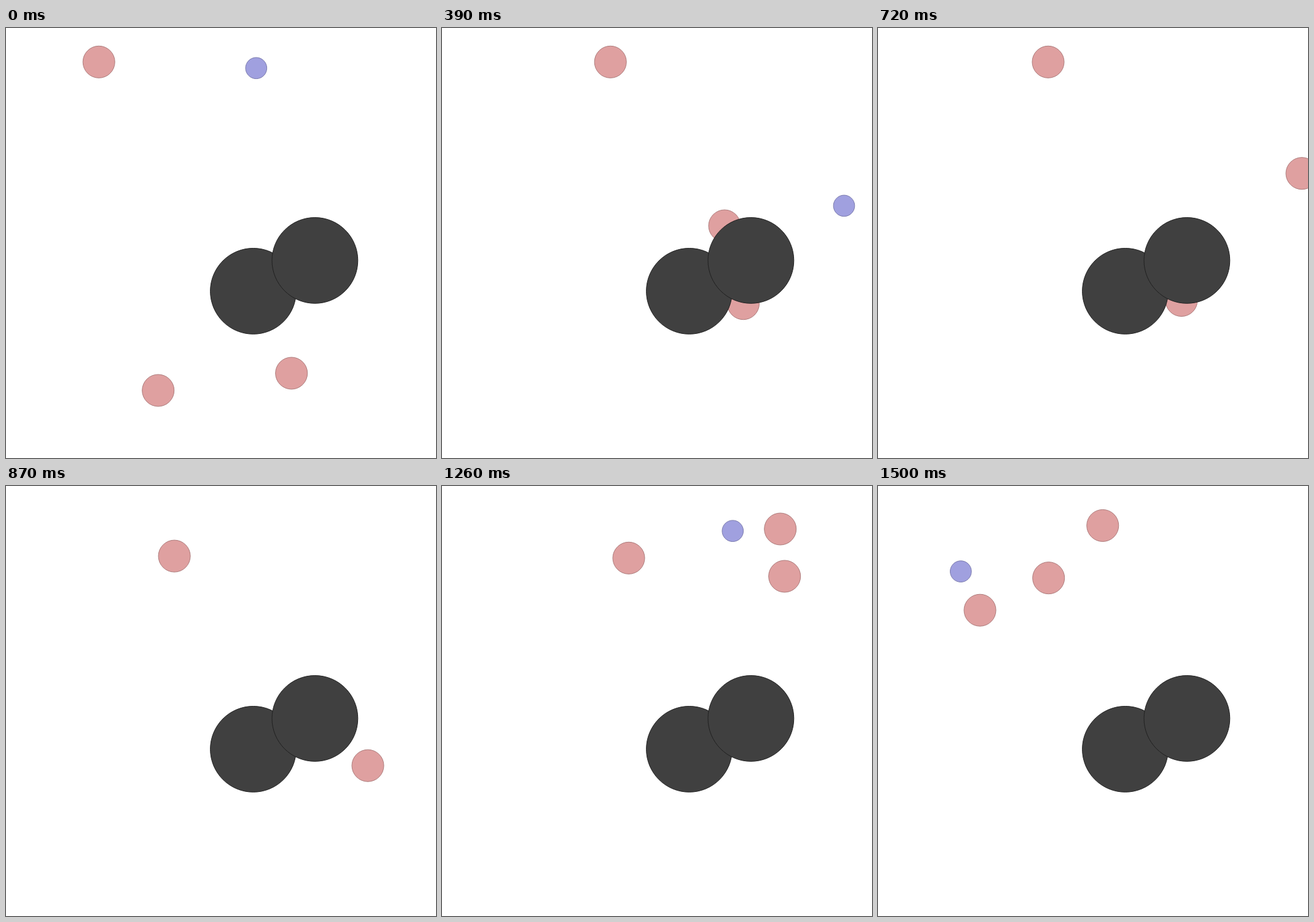
Write an HTML page with a canvas that moves like this. It is 700 px wide and 700 px high and loops after 1.53 s.

```html
<!DOCTYPE html>
<html lang="en">
<head>
<meta charset="utf-8">
<title>Pursuit</title>
<style>
  html, body { margin: 0; height: 100%; overflow: hidden; background: #fff; }
  canvas { display: block; }
</style>
</head>
<body>
<canvas id="stage" width="700" height="700"></canvas>
<script>
const ctx = document.getElementById('stage').getContext('2d');
const STEP = 30, STEPS = 51, DAMPING = 0.75;

// Smooth motion through a few key points [step, x, y]
function route(...keys) {
  const last = keys.length - 2;
  const span = i => keys[i + 1][0] - keys[i][0];
  const rate = (i, axis) => (keys[i + 1][axis] - keys[i][axis]) / span(i);
  const slope = (i, axis) => {
    if (i === 0) return rate(0, axis);
    if (i > last) return rate(last, axis);
    const a = span(i - 1), b = span(i);
    return (rate(i - 1, axis) * b + rate(i, axis) * a) / (a + b);
  };
  return n => {
    let i = 0;
    while (i < last && keys[i + 1][0] <= n) i++;
    const h = span(i), u = (n - keys[i][0]) / h, v = 1 - u;
    return [1, 2].map(axis =>
      keys[i][axis] * v * v * (1 + 2 * u) + keys[i + 1][axis] * u * u * (3 - 2 * u)
      + h * u * v * (slope(i, axis) * v - slope(i + 1, axis) * u));
  };
}

// The first chaser glides to rest, then turns
const glide = n => [151.2 + 126 * (1 - DAMPING ** n), 55.3];
const turn = route([24, 277, 55.3], [35, 277, 159], [42, 304, 117.3], [50, 166, 202.2]);

const chasers = [
  n => n < 24 ? glide(n) : turn(n),
  route([0, 247.7, 590], [5, 326.4, 460.7], [8, 320, 385], [13, 460, 322],
    [24, 690, 236.7], [35, 717, 234], [42, 550.7, 70], [50, 365.8, 64.4]),
  route([0, 464.7, 562], [5, 480, 405], [13, 490.5, 448.7], [22, 493, 458],
    [24, 494, 443.5], [28, 572, 470], [35, 655.4, 248.6], [42, 557.7, 147], [50, 277.7, 149.7]),
];
const runner = route([0, 407.3, 65.3], [5, 484.9, 232.4], [13, 654.5, 289.4],
  [17, 765, 298], [37, 690, 113], [42, 473.3, 73.2], [50, 134.8, 139.1]);

function disc([x, y], radius, fill, edge) {
  ctx.beginPath();
  ctx.arc(x, y, radius, 0, Math.PI * 2);
  ctx.fillStyle = fill;
  ctx.fill();
  ctx.strokeStyle = edge;
  ctx.stroke();
}

const obstacle = pos => disc(pos, 69.9, '#404040', '#202020');

function draw(now) {
  const n = Math.floor(now / STEP) % STEPS;
  ctx.fillStyle = '#fff';
  ctx.fillRect(0, 0, 700, 700);
  for (const chaser of chasers) disc(chaser(n), 26, '#dfa0a0', '#ad7b7b');
  disc(runner(n), 17.3, '#a0a0df', '#7b7bad');
  obstacle([402.5, 428.4]);
  obstacle([502.9, 378.4]);
  requestAnimationFrame(draw);
}
requestAnimationFrame(draw);
</script>
</body>
</html>
```
